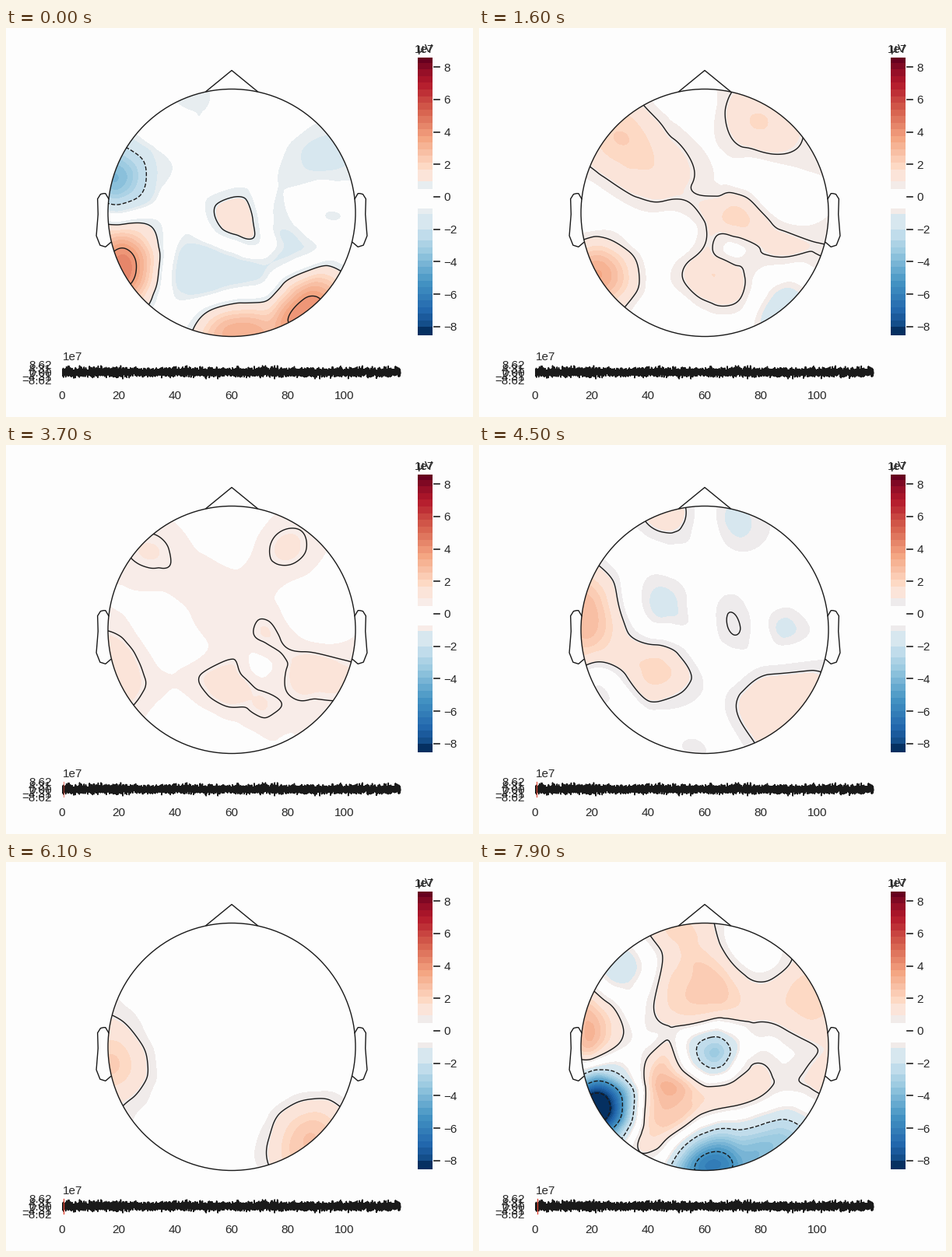
A matplotlib script for the animation above (8000 ms loop, 600 by 500 pixels).

```python
import numpy as np
import matplotlib.pyplot as plt
from matplotlib.animation import FuncAnimation
from matplotlib.patches import Circle, Rectangle
from matplotlib.tri import CubicTriInterpolator, Triangulation

W, H, FRAMES, STEP = 600, 500, 80, 100
PX = 0.72  # one pixel in points
BG, INK, TEXT = "#fdfdfd", "#1a1a1a", "#262626"
PINK, PALE = "#fbe4d9", "#d7e7ef"
CX, CY, R = 290, 237.5, 159
VMAX = 8.62

plt.rcParams["font.family"] = "Liberation Sans"
plt.rcParams["font.size"] = 11

# electrode places on the stage
SITES = dict(
    Fp1=(250, 100), Fp2=(312, 102), AF3=(193, 147), AF4=(345, 138),
    F7=(148, 202), FC1=(248, 207), Fz=(313, 190), FC2=(352, 200), F8=(408, 182),
    T7=(146, 262), C3=(205, 232), Cz=(298, 247), C2=(330, 248), C4=(393, 251), T8=(436, 278),
    P7=(162, 305), P3=(217, 287), Pz=(287, 300), CP2=(330, 282), P2=(328, 312), P4=(371, 282),
    PO7=(223, 348), Oz=(288, 376), PO8=(382, 347))

# frame, tint of the faintest band, potentials that differ from zero
POSES = [
    (0, "#e7edf0", dict(Fp1=-.8, AF3=-.5, F7=-3.7, T7=1.9, P7=4.1, PO7=-.8, Oz=2.6, PO8=3.6,
                        P4=-1.2, Pz=-1.5, P2=-1.2, Cz=1.5, P3=-.7, F8=-1.1, FC2=-.75, AF4=-.3)),
    (16, "#f3ebe8", dict(AF3=2.1, AF4=1.4, Fp2=.7, FC1=1.15, Fz=.3, Cz=1.2, C2=1.9, C4=.5, P4=1.1,
                         T8=.9, T7=.5, P7=3, C3=.5, Pz=1.3, CP2=.3, P2=1.2, PO8=-1.3, F8=.4, F7=.4)),
    (25, "#f2ebe8", dict(AF3=2.3, F7=2.4, Fp1=1.7, Fp2=.3, T7=-4.7, P7=1.9, P3=1.1, PO7=1.2, FC1=.9,
                         Fz=.8, FC2=.8, F8=2, AF4=.3, Cz=.4, C2=1.7, CP2=1.5, C4=.4, T8=.8,
                         P4=1, P2=1.3, Pz=.4, Oz=.4, PO8=-6.4)),
    (37, "#f8ece8", dict(AF3=.97, AF4=.97, FC1=.7, Fz=.55, FC2=.4, Cz=.7, C2=.95, F7=.4, T7=1.15,
                         P7=1.15, P3=.4, Pz=1.2, P2=.8, CP2=.3, P4=1.05, T8=.9, C4=.4, PO8=.65)),
    (52, "#eeebec", dict(AF3=.65, Fp2=.5, F7=1.1, T7=1.85, P7=1, PO8=2.5, Oz=.2, P2=.55)),
    (61, "#f0ebea", dict(F7=.85, T7=2.1, P7=.85, PO8=2.4)),
    (79, "#f1ebe9", dict(Fp1=1.7, Fp2=.7, AF3=-1.3, AF4=.5, F7=2.7, T7=-.7, P7=-9, P3=1.4, PO7=1.8,
                         Oz=-5.2, PO8=-3, P4=1.1, CP2=1, P2=1, Pz=1.7, Cz=-3.2, C2=-1.1, C4=.4,
                         T8=1.2, F8=1.9, FC2=1.1, Fz=1.7, FC1=1.1, C3=.3)),
]
POSE_AT = np.array([p[0] for p in POSES])

# cubic surface over the electrodes and a rim outside the head
spots = np.array(list(SITES.values()), float)
angle = np.arange(20) * 2 * np.pi / 20
rim = np.column_stack([CX + 1.13 * R * np.cos(angle), CY + 1.13 * R * np.sin(angle)])
near = np.linalg.norm(rim[:, None] - spots[None], axis=2) ** -4.0
near /= near.sum(axis=1, keepdims=True)
mesh = Triangulation(*np.vstack([spots, rim]).T)

gx = np.arange(CX - R - 3, CX + R + 4, 2.0)
gy = np.arange(CY - R - 3, CY + R + 4, 2.0)
X, Y = np.meshgrid(gx, gy)


def surface(values):
    z = np.concatenate([values, near @ values])
    return CubicTriInterpolator(mesh, z, kind="min_E")(X, Y)


maps = [surface(np.array([v.get(name, 0.0) for name in SITES])) for _, _, v in POSES]

# slow drift that fades out at every pose
rng = np.random.default_rng(4)
drifts = [surface(rng.normal(0, 0.8, len(SITES))) for _ in range(3)]


def field(i):
    k = min(np.searchsorted(POSE_AT, i, side="right") - 1, len(POSES) - 2)
    u = (i - POSE_AT[k]) / (POSE_AT[k + 1] - POSE_AT[k])
    e = u * u * (3 - 2 * u)
    drift = sum(np.sin(0.4 * i + 2.1 * j) * d for j, d in enumerate(drifts))
    return maps[k] * (1 - e) + maps[k + 1] * e + np.sin(np.pi * u) * drift


EDGES = np.concatenate([[-30], -2.7 - 0.41 * np.arange(13, -1, -1), [-2, -1.05, -0.72],
                        [0.48, 0.98], 1.7 + 0.41 * np.arange(17), [30]])
MIDS = np.clip((EDGES[1:] + EDGES[:-1]) / 2, -VMAX, VMAX)
MIDS -= 0.15 * np.sign(MIDS) * (np.abs(MIDS) < 8)
LINES = [-8.5, -5.3, -2, 0.88, 3.7]
ZERO = int(np.searchsorted(EDGES, 0)) - 1


def palette(i):
    tint = POSES[np.abs(POSE_AT - i).argmin()][1]
    cols = [plt.cm.RdBu_r(0.5 + m / (2 * VMAX)) for m in MIDS]
    cols[ZERO - 2:ZERO + 3] = [PALE, tint, BG, tint, PINK]
    return cols


fig = plt.figure(figsize=(W / 100, H / 100), dpi=100, facecolor=BG)
ax = fig.add_axes([0, 0, 1, 1])
ax.set(xlim=(0, W), ylim=(H, 0))
ax.axis("off")


def line(xs, ys, w=1.4, color=INK, z=5):
    return ax.plot(xs, ys, color=color, lw=w * PX, zorder=z)[0]


def label(x, y, s, ha="left"):
    ax.text(x, y, s.replace("-", "\u2212"), ha=ha, va="baseline", color=TEXT)


# head
head = ax.add_patch(Circle((CX, CY), R, fc="none", ec=INK, lw=1.4 * PX, zorder=5))
line([257, 290, 323], [81.5, 54.5, 81.5])
ear_x = 2 * R * np.array([.497, .510, .518, .530, .542, .540, .547, .532, .510, .489])
ear_y = 2 * R * np.array([.056, .078, .078, .075, .056, -.006, -.093, -.131, -.138, -.120])
for side in (-1, 1):
    line(CX + side * ear_x, CY - ear_y)


# colour bar
def bar_y(v):
    return 217 - 20.85 * v


bars = []
for lo, hi in zip(EDGES[:-1], EDGES[1:]):
    top, bottom = max(bar_y(hi), 38), min(bar_y(lo), 394.5)
    bars.append(ax.add_patch(Rectangle((529, top), 19, bottom - top, lw=0, antialiased=False)))
for v in range(-8, 9, 2):
    line([550, 557], [bar_y(v)] * 2, 1.7, TEXT)
    label(562.7, bar_y(v) + 5.5, str(v))
label(525, 32.5, "1e7")
label(538, 30.5, "\u00b5V", "center")

# signal strip
n = 6000
line(np.linspace(73, 506.5, n), 442.5 + np.clip(rng.normal(0, 2.7, n), -8.5, 8.5), 1.6)
for k in range(5):
    label(58.7, 438.3 + 5 * k, f"{VMAX * (1 - k / 2):.2f}", "right")
for s in range(0, 101, 20):
    label(71.8 + 3.63 * s, 477, str(s), "center")
label(73, 426.8, "1e7")
cursor = line([73, 73], [433, 452], 1.3, "#e0402f", 7)

layers = []


def draw(i):
    while layers:
        layers.pop().remove()
    cols, v = palette(i), field(i)
    fill = ax.contourf(gx, gy, v, levels=EDGES, colors=cols, zorder=2)
    rims = ax.contour(gx, gy, v, levels=LINES, colors=INK, linewidths=1.4 * PX, zorder=3)
    for layer in (fill, rims):
        layer.set_clip_path(head)
        layers.append(layer)
    for bar, c in zip(bars, cols):
        bar.set_facecolor(c)
    cursor.set_xdata([72.5 + 3.63 * i / 128] * 2)
    cursor.set_alpha(float(np.clip((i - 20) / 28, 0, 1)))
    return layers


anim = FuncAnimation(fig, draw, frames=FRAMES, interval=STEP, repeat=True, repeat_delay=0)
plt.show()
```
